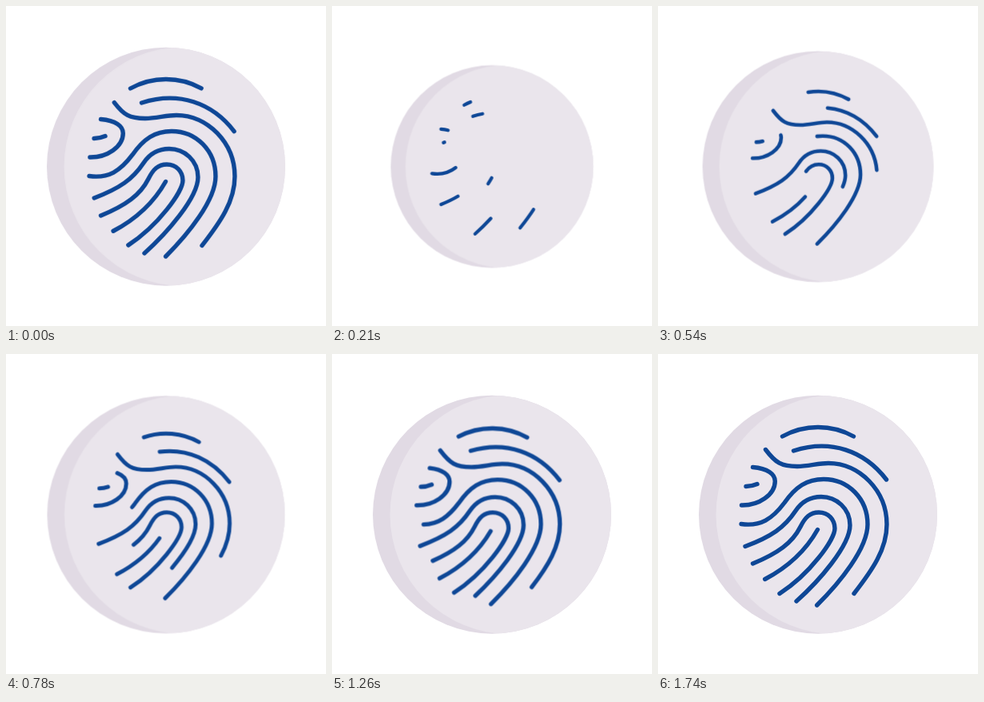
These frames come from a looping animation (400 px wide and 400 px high, 2800 ms). An HTML page:

```html
<!DOCTYPE html>
<html lang="en">
<head>
<meta charset="utf-8">
<title>Fingerprint</title>
<style>
  html, body { margin: 0; width: 100%; height: 100%; overflow: hidden; background: #fff; }
  svg { display: block; width: 100%; height: 100%; }

  .disc, .print { animation: 2800ms infinite; }
  .disc {
    transform-origin: 200px 200.7px;
    animation-name: disc;
  }
  .print {
    transform-origin: 200px 198px;
    animation-name: print;
    fill: none;
    stroke: #0e4796;
    stroke-width: 5.4;
    stroke-linecap: round;
    stroke-linejoin: round;
  }
  .print path {
    stroke-dasharray: 1 1;
    animation: trace 2800ms infinite;
  }

  @keyframes disc {
    0% { transform: scale(1); animation-timing-function: cubic-bezier(.3, .1, .7, .9); }
    10.714% { transform: scale(.8); animation-timing-function: cubic-bezier(.18, 1, .4, 1); }
    38.571%, 100% { transform: scale(1); }
  }
  @keyframes print {
    0% { transform: scale(1); animation-timing-function: cubic-bezier(.3, .1, .7, .9); }
    10.714% { transform: scale(.71); animation-timing-function: cubic-bezier(.19, 1, .8, 1); }
    62.143%, 100% { transform: scale(1); }
  }
  /* Offset 0 to 1 erases each ridge towards its start, 1 to 2 redraws it from its end. */
  @keyframes trace {
    0% { stroke-dashoffset: 0; animation-timing-function: linear; }
    8.571% { stroke-dashoffset: 1; animation-timing-function: cubic-bezier(.09, 1, .68, 1); }
    64.286%, 100% { stroke-dashoffset: 2; }
  }
</style>
</head>
<body>
<svg viewBox="0 0 400 400">
  <clipPath id="rim"><circle cx="200" cy="200.7" r="149"/></clipPath>
  <g class="disc">
    <circle cx="200" cy="200.7" r="149" fill="#e1dae4"/>
    <g clip-path="url(#rim)"><circle cx="222" cy="200.7" r="149.5" fill="#eae5ec"/></g>
  </g>
  <g class="print">
    <path pathLength="1" d="M155.5 103A92 92 0 0 1 244.5 103"/>
    <path pathLength="1" d="M169.5 121C216 106 258 121 285.5 157"/>
    <path pathLength="1" d="M245 299.5C268 270 286 244 286 213C286 171 252 136.5 213 136.5C200 136.5 188 140.5 174 140.5C154 140.5 147 136 134.5 119.5"/>
    <path pathLength="1" d="M118.5 141.5C137 143 146.3 150 146.3 159C146.3 176 126 189.5 104.5 189"/>
    <path pathLength="1" d="M124 162.5Q117 165.5 110 165.5"/>
    <path pathLength="1" d="M104 212.5C128 216 143 206 158 186C172 166 186 156.5 207 156.5C238 156.5 262 181 262 213C262 243 227 286 198.7 314"/>
    <path pathLength="1" d="M173 309C200 285 240 240 240 214C240 193 223 178.5 204 178.5C190 178.5 180 184 172 196C158 217 142 228 109 240.5"/>
    <path pathLength="1" d="M118.5 262C150 249 168 236 178 216C184 204 190 198 201 198C213 198 221 207 221 218C221 232 190 275 152 299.5"/>
    <path pathLength="1" d="M199.5 219.5C186 243.5 167 264 133.7 281.5"/>
  </g>
</svg>
</body>
</html>
```
